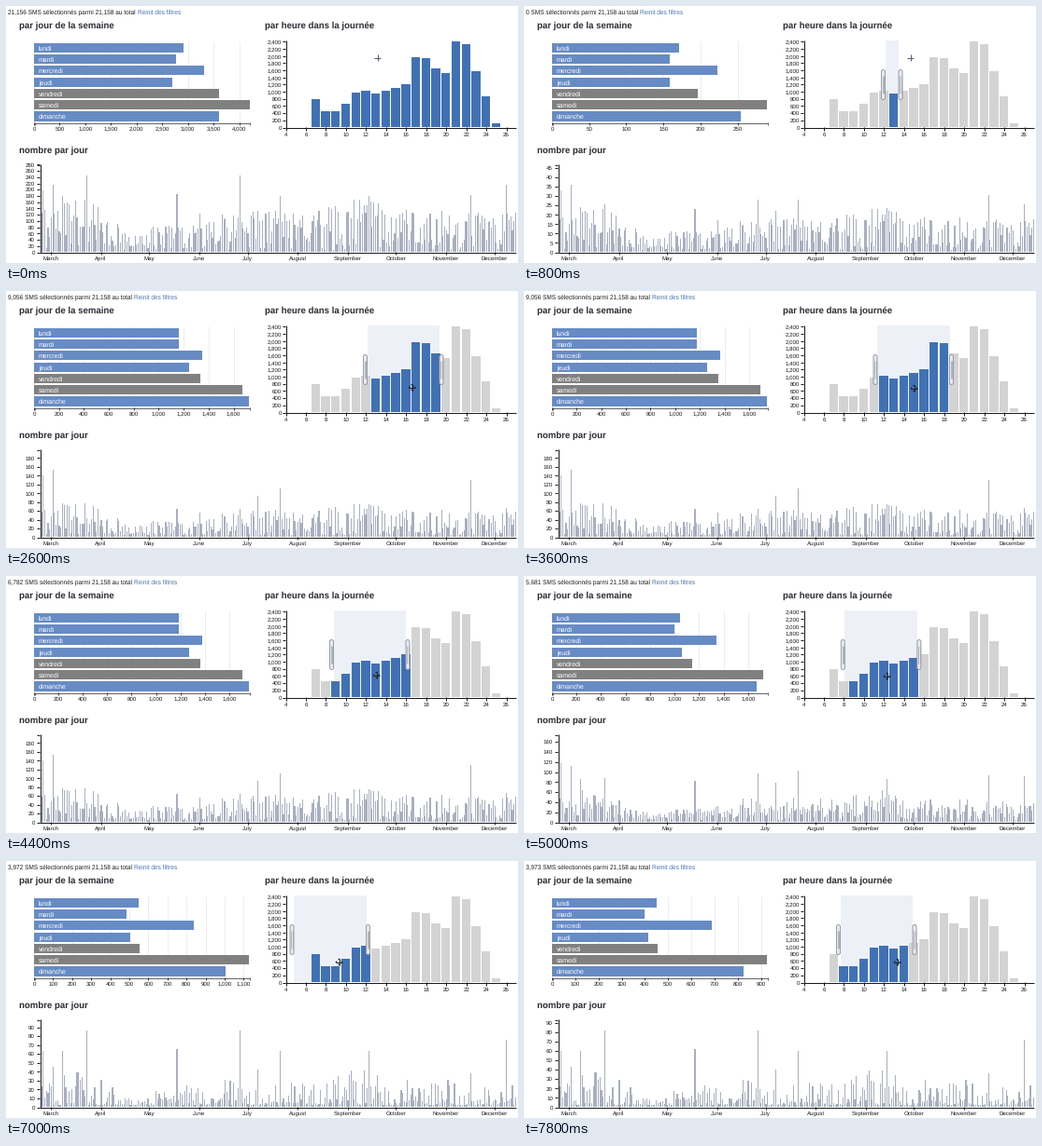
Recreate the animation shown at these times as a matplotlib script. Size 548 by 276 pixels, loop 8000 ms.

```python
import matplotlib.pyplot as plt
import numpy as np
from matplotlib.animation import FuncAnimation
from matplotlib.collections import PolyCollection
from matplotlib.patches import FancyBboxPatch, Rectangle

W, H, DPI = 548, 276, 64
PT = 72 / DPI  # points per pixel
FRAMES, STEP_MS = 40, 200
BLUE, SOFT_BLUE, GRAY, PALE = "#4171b5", "#678bc4", "#808080", "#d3d3d3"
INK, DAY_COLOR = "#1a1a1a", "#a8afbf"

plt.rcParams["font.family"] = "Liberation Sans"
plt.rcParams["text.hinting"] = "none"
fig = plt.figure(figsize=(W / DPI, H / DPI), dpi=DPI, facecolor="white")
ax = fig.add_axes([0, 0, 1, 1])
ax.set_xlim(0, W)
ax.set_ylim(H, 0)
ax.axis("off")

# Messages per hour, from 4h to 25h
COUNT = np.array([0, 1, 0, 719, 405, 402, 609, 900, 937, 872, 944, 1017, 1101,
                  1816, 1780, 1526, 1407, 2222, 2147, 1446, 804, 103])
TOTAL = 21158
HOUR_STEP = 10.73
HOUR_X = 299 + np.arange(len(COUNT)) * HOUR_STEP

# Pointer path: draw the brush to the right, then drag it left and back
POINTER_F = [0, 1, 3, 8, 10, 13, 16, 20, 22, 28, 34, 37, 38, 39]
POINTER_X = [397, 387, 401, 464, 464, 434, 434, 400, 396, 380.5, 355.5, 357,
             386, 399]
BRUSH_LEFT, BRUSH_RIGHT, GRIP = 386.5, 464, 47.5
DRAW_START, DRAG_START = 3, 14

# Weekday bar lengths in pixels: all hours, midday rush, working hours
WEEKDAYS = "lundi mardi mercredi jeudi vendredi samedi dimanche".split()
WEEK_BARS = np.array([(160, 152, 182, 148, 198, 230.5, 198),
                      (112, 99, 171, 103, 113, 230, 205),
                      (155, 155, 180, 166, 178, 223, 230)])

# Frame, weekday profile, day profile, top of weekday axis, top of day axis
KEYS = np.array([(0, 0, 0, 4200, 281), (1, 0, 0, 4200, 281),
                 (4, .5, .5, 290, 47), (8, 1, 1, 746, 141),
                 (13, 2, 1, 1727, 200), (22, 2, 1, 1765, 200),
                 (29, 1, 2, 1747, 147), (35, 1, 2, 1130, 99),
                 (39, 1, 2, 927, 93.5)]).T

# Daily bars: skewed noise under a seasonal curve, plus a few tall days
N_DAYS, DAY_W = 295, 1.726
DAY_X = 37.5 + np.arange(N_DAYS) * DAY_W
PEAK_X = [39, 50, 60, 86, 182, 249, 269, 293, 388, 497, 535]
NOON_PEAKS = np.array([66, 72, 36, 20, 30, 30, 44, 52, 35, 61, 31])
MORNING_PEAKS = np.array([60, 43, 60, 82, 62, 82, 40, 60, 60, 36, 72])


def bump(x, width):
    return np.exp(-((DAY_X - x) / width) ** 2)


SEASON = .85 - .55 * bump(138, 24) + .3 * bump(80, 25) + .4 * bump(378, 25)


def series(seed, top, skew, peaks):
    noise = np.random.default_rng(seed).random(N_DAYS)
    h = 2 + top * SEASON * noise ** skew
    h[[np.abs(DAY_X - x).argmin() for x in PEAK_X]] = peaks
    return h


DAY_BARS = np.array([
    series(4, 50, 1.2, np.maximum(NOON_PEAKS, MORNING_PEAKS)),
    series(4, 32, 1.6, NOON_PEAKS),
    series(9, 32, 2.4, MORNING_PEAKS)])

live = []


def keep(artist, dynamic):
    if dynamic:
        live.append(artist)
    return artist


def text(x, y, s, size=6.1, color=INK, ha="center", dynamic=False, **kw):
    """Text whose digits are centred on height y."""
    keep(ax.text(x, y + .36 * size, s, fontsize=size * PT, color=color, ha=ha,
                 va="baseline", zorder=6, **kw), dynamic)


def line(xs, ys, color=INK, width=1, z=5, dynamic=False):
    keep(ax.plot(xs, ys, color=color, lw=width * PT, zorder=z,
                 solid_capstyle="butt")[0], dynamic)


def box(x, y, w, h, color, z=2, dynamic=False):
    return keep(ax.add_patch(Rectangle((x, y), w, h, fc=color, lw=0,
                                       zorder=z)), dynamic)


def key(f, row, log=False):
    values = np.log(KEYS[row]) if log else KEYS[row]
    value = np.interp(f, KEYS[0], values)
    return np.exp(value) if log else value


def blend(rows, at):
    low = min(int(at), len(rows) - 2)
    return rows[low] + (rows[low + 1] - rows[low]) * (at - low)


def ticks(scale, gap, top):
    """Round values up to `top` pixels, at least `gap` pixels apart."""
    steps = [2, 5, 10, 20, 50, 100, 200, 500]
    step = next(s for s in steps if s * scale >= gap)
    return range(0, int(top / scale) + 1, step)


def pointer(f):
    return (np.interp(f, POINTER_F, POINTER_X),
            np.interp(f, [8, 13, 28], [55, 103, 108]))


def brush(f):
    """Selected span in pixels; it trails the pointer by one frame."""
    if f < DRAW_START:
        return None
    x = pointer(f - 1)[0]
    if f < DRAG_START:
        return BRUSH_LEFT, (x if f < 9 else BRUSH_RIGHT)
    left = x - GRIP
    return left, left + BRUSH_RIGHT - BRUSH_LEFT


def selected(f):
    span = brush(f)
    if span is None:
        return np.ones(len(COUNT), bool)
    return (HOUR_X >= span[0]) & (HOUR_X < span[1])


# ---- fixed parts --------------------------------------------------------
for x, y, s in [(14, 20.5, "par jour de la semaine"),
                (277, 20.5, "par heure dans la journée"),
                (14, 154, "nombre par jour")]:
    text(x, y, s, 9.66, "#2b2b33", "left", weight="bold")

for v in range(0, 2401, 200):
    y = 130.5 - v * 92.3 / 2400
    line([296, 299], [y, y])
    text(295, y, f"{v:,}", ha="right")
for h in range(4, 27, 2):
    x = 299.5 + (h - 4) * HOUR_STEP
    line([x, x], [130, 134])
    text(x, 138, str(h))
line([299.5, 299.5], [37, 131])
line([299, 546], [130.5, 130.5])

MONTHS = ("March April May June July August September October November "
          "December").split()
for i, month in enumerate(MONTHS):
    x = 48 + round(30.6 * i) * DAY_W
    line([x, x], [264, 267])
    text(x, 271, month)
line([36.5, 36.5], [170, 265])
line([33, 36], [170.5, 170.5])
line([36, 546], [264.5, 264.5])

line([30, 261], [125.5, 125.5], "#666666")
for x in (30.5, 260.5):
    line([x, x], [125, 128], "#666666")

hour_bars = [box(x - 4.6, 130 - c * .0414, 9.4, c * .0414, BLUE)
             for x, c in zip(HOUR_X, COUNT)]
week_bars = []
for i, name in enumerate(WEEKDAYS):
    y = 39.6 + i * 12.3
    color = GRAY if name in ("vendredi", "samedi") else SOFT_BLUE
    week_bars.append(box(30, y, 200, 10.3, color))
    text(35, y + 5.5, name, 6.9, "white", "left")
day_bars = ax.add_collection(PolyCollection(
    np.zeros((1, 4, 2)), facecolors=DAY_COLOR, linewidths=0, zorder=2))


# ---- moving parts -------------------------------------------------------
def draw_week_axis(f):
    scale = 230.5 / key(f, 3, log=True)
    for v in ticks(scale, 20, 230.5):
        x = 30 + v * scale
        line([x, x], [38, 125], "#e9e9e9", .8, 1, True)
        line([x, x], [125, 128], INK, .8, 5, True)
        text(x, 131.5, f"{v:,}", dynamic=True)


def draw_day_axis(f):
    scale = 94.5 / key(f, 4, log=True)
    for v in ticks(scale, 6.71, 94.5):
        y = 264.5 - v * scale
        line([33, 36], [y, y], dynamic=True)
        text(31, y, str(v), ha="right", dynamic=True)


def draw_day_bars(f):
    left, base = DAY_X, np.full(N_DAYS, 264)
    right, top = left + 1.15, base - blend(DAY_BARS, key(f, 2))
    corners = [(left, base), (left, top), (right, top), (right, base)]
    day_bars.set_verts(np.array(corners).transpose(2, 0, 1))


def draw_handle(x):
    live.append(ax.add_patch(FancyBboxPatch(
        (x + .5, 68.5), 4, 32, boxstyle="round,pad=0,rounding_size=2",
        fc="#e8eaee", ec="#92969e", lw=.9 * PT, zorder=7)))
    for dx in (1.8, 3.2):
        line([x + dx] * 2, [75, 94], "#9a9fa8", .7, 8, True)


def draw_brush(f):
    span = brush(f)
    if span:
        lo, hi = span
        box(lo, 37, hi - lo, 93, "#edf1f7", 1, True)
        draw_handle(lo - 4.5)
        draw_handle(hi - .5)


def draw_pointer(f):
    x, y = np.floor(pointer(f)) + .5
    moving = f > 10
    color = "#222222" if moving else "#55587a"
    line([x - 3.5, x + 3.5], [y, y], color, 1, 9, True)
    line([x, x], [y - 3.5, y + 3.5], color, 1, 9, True)
    if not moving:
        return
    for dx, dy in ((1, 0), (-1, 0), (0, 1), (0, -1)):
        out, side = np.array([dx, dy]), np.array([dy, dx]) * 1.5
        tip, root = (x, y) + out * 4, (x, y) + out * 2.3
        live.extend(ax.fill(*np.array([tip, root + side, root - side]).T,
                            color=color, lw=0, zorder=10))


def draw_header(f):
    unfiltered = f <= DRAW_START
    count = TOTAL - 2 if unfiltered else COUNT[selected(f - 1)].sum()
    number, size = f"{count:,}", 6.52
    text(2, 6.3, f"{number} SMS sélectionnés parmi {TOTAL:,} au total", size,
         INK, "left", True)
    digits, commas = sum(c.isdigit() for c in number), number.count(",")
    link_x = 2 + size * (18.23 + .556 * digits + .278 * commas)
    text(link_x, 6.3, "Reinit des filtres", size, "#4573b0", "left", True)


def update(f):
    for artist in live:
        artist.remove()
    live.clear()

    for bar, length in zip(week_bars, blend(WEEK_BARS, key(f, 1))):
        bar.set_width(length)
    for bar, on in zip(hour_bars, selected(f)):
        bar.set_facecolor(BLUE if on else PALE)
    for draw in (draw_day_bars, draw_brush, draw_week_axis, draw_day_axis,
                 draw_header, draw_pointer):
        draw(f)
    return []


anim = FuncAnimation(fig, update, frames=FRAMES, interval=STEP_MS,
                     init_func=lambda: update(0), repeat=True, repeat_delay=0)
plt.show()
```
